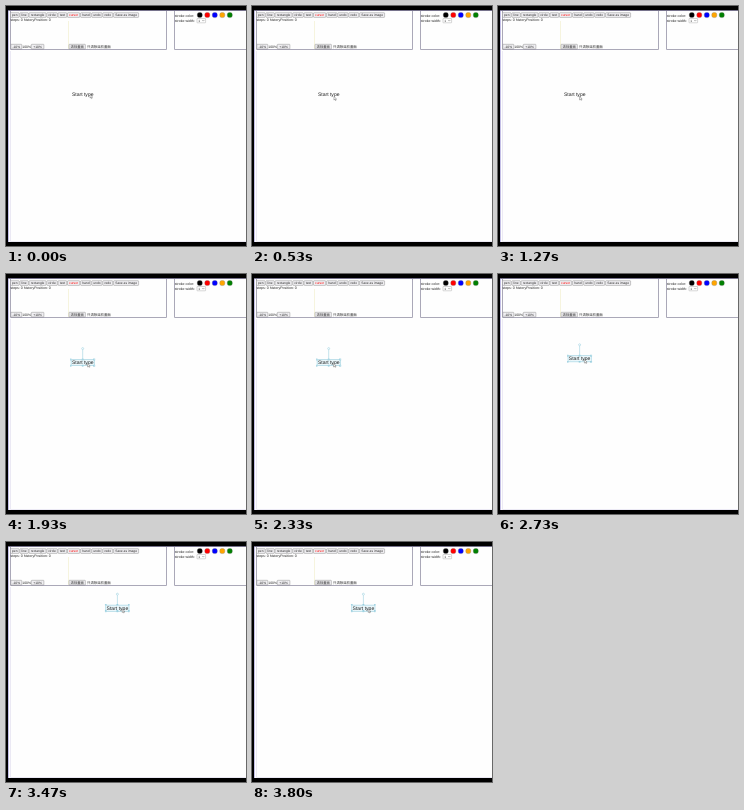
These frames come from a looping animation (240x240 px, 3.87 s). An HTML page:

```html
<!DOCTYPE html>
<html lang="en">
<head>
<meta charset="utf-8">
<title>Drawing board</title>
<style>
html, body { margin: 0; width: 100%; height: 100%; overflow: hidden; background: #000; }
svg { display: block; width: 100vw; height: 100vh; }
text { font-family: "Liberation Sans", Arial, sans-serif; text-rendering: geometricPrecision; fill: #222; }
.cjk { font-family: "Noto Sans CJK TC", "Noto Sans CJK", "Noto Sans CJK SC", sans-serif; }
</style>
</head>
<body>
<svg id="stage" viewBox="0 0 240 240">
  <rect width="240" height="240" fill="#000"/>
  <rect x="2" y="4" width="238" height="232" fill="#fefefe"/>
  <path d="M2.5 4V236" stroke="#c4bfe6"/>
  <path d="M2 4.5H240" stroke="#77738c"/>
  <path d="M4.5 5V43.5H160.5V5M168.5 5V43.5H240" fill="none" stroke="#aaa8b8"/>
  <path d="M4.5 45V235.5H240" fill="none" stroke="#ebe9f4"/>
  <path d="M62.5 15V43" stroke="#f6f4de"/>
  <g id="ui"></g>
  <g id="label">
    <g id="selection" fill="none" stroke="#8cc8da" stroke-width=".5">
      <rect x="-11.6" y="-3.1" width="23.2" height="6.2" fill="#eaf7fb"/>
      <path d="M0 -3.1V-13"/>
      <g id="handles" fill="#fff"></g>
    </g>
    <text y="1.7" font-size="5.05" text-anchor="middle">Start type</text>
  </g>
  <path id="pointer" d="M0 0V3.6L.9 2.8L1.5 4.1L2.1 3.8L1.5 2.6H2.7Z" fill="#fff" stroke="#555" stroke-width=".4"/>
</svg>
<script>
const LOOP = 3870, STEP = 1000 / 15, SELECT_AT = 1600;
const $ = id => document.getElementById(id);

function add(parent, tag, attrs, content) {
  const el = document.createElementNS("http://www.w3.org/2000/svg", tag);
  for (const key in attrs) el.setAttribute(key, attrs[key]);
  if (content) el.textContent = content;
  parent.appendChild(el);
  return el;
}

const ui = $("ui");

function write(x, y, content, size = 3.3, attrs = {}) {
  return add(ui, "text", { x, y, "font-size": size, ...attrs }, content);
}

function button(x, y, width, label, attrs = {}) {
  add(ui, "rect", { x, y, width, height: 4.7, rx: .6, fill: "#f0eff2", stroke: "#777", "stroke-width": .4 });
  write(x + width / 2, y + 3.4, label, 3.3, { "text-anchor": "middle", ...attrs });
}

const tools = [
  ["pen", 4.5, 8.6], ["line", 13.9, 8.4], ["rectangle", 23.1, 16.9], ["circle", 40.8, 10.5],
  ["text", 52.1, 8.6], ["cursor", 61.5, 12.2], ["hand", 74.6, 10.4], ["undo", 85.8, 10.2],
  ["redo", 96.8, 9.9], ["Save as image", 107.6, 25]
];
for (const [name, x, width] of tools)
  button(x, 6.7, width, name, name === "cursor" ? { style: "fill:#f00" } : {});

write(4.4, 15.3, "steps: 0 historyPosition: 0", 3.55);
button(4.8, 38.3, 11, "-10%");
write(16.3, 41.8, "100%", 3.4);
button(25.3, 38.3, 12.6, "+10%");
button(63, 38.3, 16.4, "清除畫面", { class: "cjk" });
write(81, 41.8, "只清除目前畫面", 3.4, { class: "cjk" });

write(168.8, 10.7, "stroke color:", 3.55);
["black", "red", "blue", "orange", "green"].forEach((fill, i) =>
  add(ui, "rect", { x: 191.3 + i * 7.5, y: 6.6, width: 5, height: 5, rx: 1.8, fill, stroke: "#777", "stroke-width": .3 }));
write(168.8, 15.8, "stroke width:", 3.55);
add(ui, "rect", { x: 191, y: 12.5, width: 8.6, height: 4.3, rx: .5, fill: "#fff", stroke: "#888", "stroke-width": .35 });
write(192.2, 15.8, "1", 3.2);
add(ui, "path", { d: "M196.3 14.1L197.3 15.1L198.3 14.1", fill: "none", stroke: "#333", "stroke-width": .4 });

for (const x of [-11.6, 0, 11.6])
  for (const y of [-3.1, 3.1])
    add($("handles"), "rect", { x: x - .6, y: y - .6, width: 1.2, height: 1.2 });
add($("handles"), "circle", { cy: -14, r: 1 });

// Keys are [time, x, y].
const labelKeys = [[0, 76.7, 88.6], [2400, 76.7, 88.6], [2730, 81.4, 84.9], [3130, 107.5, 69], [3400, 111.4, 66.2]];
const pointerKeys = [[0, 84, 88.5], [400, 82, 90.5], [1270, 81.5, 90.3], [1600, 81.5, 89.3], [2400, 81.5, 89.3]];

function at(keys, t) {
  const next = keys.findIndex(k => k[0] > t);
  if (next < 0) return keys[keys.length - 1].slice(1);
  const a = keys[next - 1], b = keys[next], p = (t - a[0]) / (b[0] - a[0]);
  return [a[1] + (b[1] - a[1]) * p, a[2] + (b[2] - a[2]) * p];
}

function draw(t) {
  const [x, y] = at(labelKeys, t);
  let [px, py] = at(pointerKeys, t);
  px += x - labelKeys[0][1];
  py += y - labelKeys[0][2];
  $("label").setAttribute("transform", `translate(${x} ${y})`);
  $("pointer").setAttribute("transform", `translate(${px} ${py})`);
  $("selection").setAttribute("visibility", t >= SELECT_AT ? "visible" : "hidden");
}

// Steps fall on 10 ms ticks, so each may begin slightly early.
const start = performance.now();
function tick() {
  const t = (performance.now() - start) % LOOP;
  draw(Math.floor((t + 7) / STEP) * STEP);
  requestAnimationFrame(tick);
}
draw(0);
requestAnimationFrame(tick);
</script>
</body>
</html>
```
